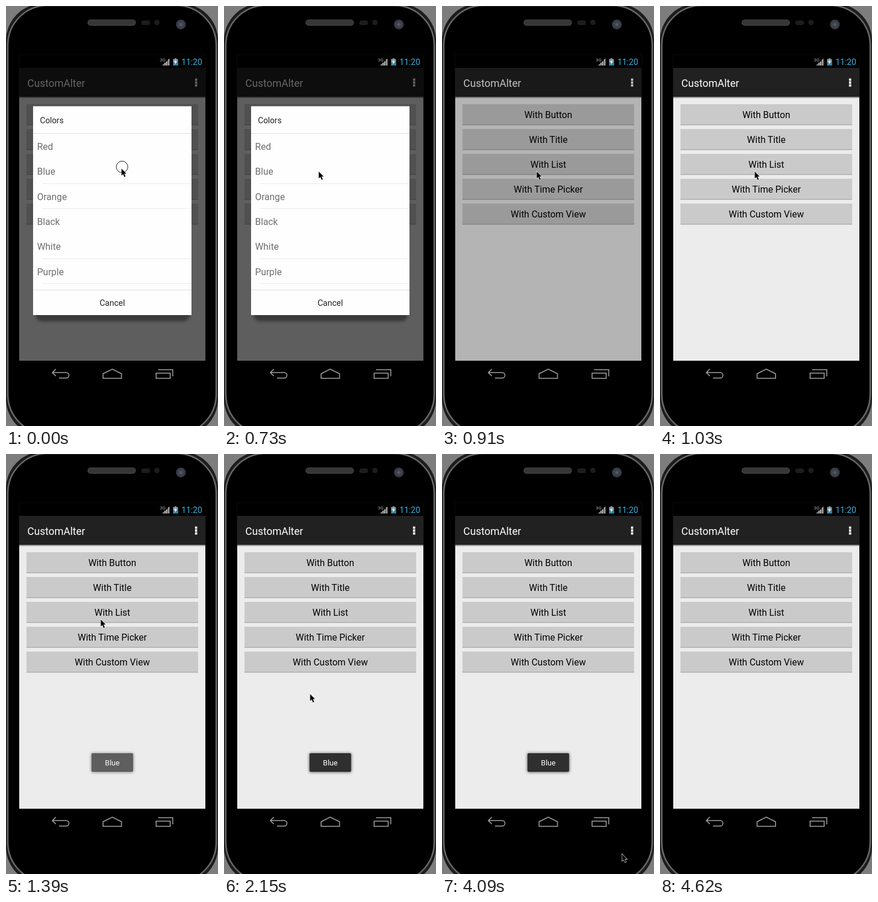
An HTML page for the animation above (4.98 s loop, 368 by 727 pixels).

```html
<!DOCTYPE html>
<html lang="en">
<head>
<meta charset="utf-8">
<title>CustomAlter</title>
<style>
html, body { margin: 0; height: 100%; overflow: hidden; background: #7d7d7d; }
svg { display: block; width: 368px; height: 727px; font-family: Roboto, sans-serif; }
.line { fill: none; stroke: #a6a6a6; stroke-width: 1.5; }
.mid { text-anchor: middle; }
</style>
</head>
<body>
<svg viewBox="0 0 368 727">
  <defs>
    <filter id="blur" x="-20%" y="-20%" width="140%" height="140%"><feGaussianBlur stdDeviation="2.5"/></filter>
    <linearGradient id="barShade" x2="0" y2="1">
      <stop stop-color="#000" stop-opacity=".6"/><stop offset="1" stop-color="#000" stop-opacity="0"/>
    </linearGradient>
    <pattern id="mesh" width="3" height="3" patternUnits="userSpaceOnUse">
      <rect width="3" height="3" fill="#272727"/><path d="M0 0L3 3M3 0L0 3" stroke="#4c4c4c" stroke-width=".7"/>
    </pattern>
  </defs>

  <!-- phone body -->
  <rect x="0" y="-4" width="368" height="748" rx="64" fill="#1c1c1c"/>
  <rect x="3" y="-1" width="362" height="742" rx="69" stroke="#505050" stroke-width="3"/>
  <rect x="3" y="-1" width="362" height="742" rx="69" fill="none" stroke="#808080"/>
  <rect x="142" y="24" width="83" height="9.5" rx="4.5" fill="url(#mesh)" stroke="#4c4c4c"/>
  <rect x="235" y="25" width="15" height="8" rx="4" fill="#1d1d1d"/>
  <circle cx="262" cy="28.5" r="4.7" fill="#1d1d1d"/>
  <circle cx="303.500" cy="32" r="8.5" fill="#383b44"/>
  <circle cx="303.500" cy="32" r="5" fill="#424754"/>
  <circle cx="303.500" cy="32" r="2" fill="#565d70"/>
  <path d="M22.5 614V84.5H346.5V614" fill="none" stroke="#0c0c0c"/>

  <!-- status bar -->
  <text x="267" y="95.500" font-size="8" fill="#aaa">3G</text>
  <path d="M272 103L284 90V103Z" fill="#444"/>
  <path d="M273 103V101M276 103V98M279 103V96M282.500 103V92" stroke="#b5b5b5" stroke-width="2"/>
  <path d="M290 92h2.500v-1.500h3.500V92h2.500v11h-8.500Z" fill="#8f979b"/>
  <path d="M290 97h8.500v6h-8.500Z" fill="#2e86a6"/>
  <path d="M295.500 93l-4 4.500h2.500l-1.500 4 4.500-5h-2.500Z" fill="#fff"/>
  <text x="304.500" y="102" font-size="14.500" fill="#33b5e5">11:20</text>

  <!-- app -->
  <rect x="23" y="107" width="323" height="507" fill="#ececec"/>
  <rect x="23" y="107" width="323" height="50" fill="#212121"/>
  <rect x="23" y="157" width="323" height="3" fill="url(#barShade)"/>
  <text x="37" y="139.500" font-size="18" fill="#fff">CustomAlter</text>
  <path d="M328 125.500h4v4h-4zM328 130.500h4v4h-4zM328 135.500h4v4h-4z" fill="#f2f2f2"/>
  <g id="buttons" font-size="16" class="mid"></g>
  <rect id="dim" x="23" y="107" width="323" height="507"/>

  <g id="dialog">
    <rect x="51" y="182" width="268" height="364" rx="12" opacity=".38" filter="url(#blur)"/>
    <rect x="47" y="173.500" width="275" height="361.500" fill="#fefefe"/>
    <text x="59" y="203" font-size="14.200" fill="#222">Colors</text>
    <path d="M47 220.500H322M47 491.500H322" stroke="#dedede"/>
    <path d="M62 307.500H322M62 350.500H322M62 437.500H322M62 480.500H322" stroke="#ebebeb"/>
    <g id="rows" font-size="16.200" fill="#6e6e6e"></g>
    <text x="184.500" y="519" font-size="14.500" fill="#222" class="mid">Cancel</text>
  </g>

  <g id="toast">
    <rect x="148" y="518" width="73" height="33" rx="2" opacity=".6" filter="url(#blur)"/>
    <rect x="149" y="518.500" width="71" height="31" rx="1" fill="#2f2f2f" stroke="#272727"/>
    <text x="184.500" y="539" font-size="13" fill="#fff" class="mid">Blue</text>
  </g>

  <!-- navigation keys -->
  <path class="line" d="M86.500 628.500L80.500 634.500L86.500 640.500M80.500 634.500H104.500a4.700 4.700 0 0 1 0 9.500H92"/>
  <path class="line" d="M168.500 636.500L184.500 628.500L200.500 636.500V644.500H168.500Z"/>
  <path class="line" d="M260.500 635.500h24.500v9h-24.500ZM264 629.500H289.500V641"/>

  <g id="cursor">
    <circle id="ring" cx="1.500" cy="-2.500" r="10" fill="none" stroke="#111"/>
    <path d="M.5 .5V12.500L3.300 10L5.500 15L7.500 14L5.300 9.300H9Z" stroke="#fff" stroke-width="1.200" paint-order="stroke"/>
  </g>
</svg>
<script>
const LOOP = 4980, TICK = 58.84, ORIGIN = 553;
const el = id => document.getElementById(id);

el('buttons').innerHTML = ['Button', 'Title', 'List', 'Time Picker', 'Custom View'].map((name, i) => {
  const y = 170 + 43 * i;
  return `<rect x="35.500" y="${y}" width="298" height="36" fill="#cacaca"/>
    <path d="M35.500 ${y + 35.8}h298" stroke="#999"/>
    <text x="184.500" y="${y + 24}">With ${name}</text>`;
}).join('');
el('rows').innerHTML = ['Red', 'Blue', 'Orange', 'Black', 'White', 'Purple'].map((name, i) =>
  `<text x="54" y="${Math.round(248.7 + 43.4 * i)}">${name}</text>`).join('');

// Pointer route: [tick, x, y]
const route = [
  [-7, 200, 281], [-4, 164, 286], [21, 164, 286], [27, 148.5, 415], [29, 143, 458], [30, 148, 473],
  [32, 185, 481], [34, 235, 503], [35.5, 260, 512], [37, 260, 548], [43, 260, 548],
  [47, 265, 577], [52, 272, 622], [61, 317, 701], [65, 330, 732]
];

const clamp = v => Math.max(0, Math.min(1, v));

function along(tick) {
  const next = route.findIndex(p => p[0] > tick);
  if (next === 0) return route[0].slice(1);
  if (next < 0) return route.at(-1).slice(1);
  const [t0, x0, y0] = route[next - 1], [t1, x1, y1] = route[next];
  const f = (tick - t0) / (t1 - t0);
  return [x0 + (x1 - x0) * f, y0 + (y1 - y0) * f];
}

function draw(now) {
  const t = now % LOOP;
  const tick = Math.floor((t - ORIGIN) / TICK);   // the screen refreshes in coarse steps
  const [x, y] = along(tick);
  el('cursor').setAttribute('transform', `translate(${Math.round(x)} ${Math.round(y)})`);
  el('ring').setAttribute('opacity', +(t < 60 || (tick >= 0 && tick < 2)));
  el('dialog').setAttribute('opacity', tick < 4 ? 1 : tick < 5 ? 0.4 : 0);
  el('dim').setAttribute('opacity', 0.6 * clamp((8 - tick) / 5));
  el('toast').setAttribute('opacity', Math.min(clamp((tick - 8) / 8), clamp((69 - tick) / 8)));
  requestAnimationFrame(draw);
}
requestAnimationFrame(draw);
</script>
</body>
</html>
```
